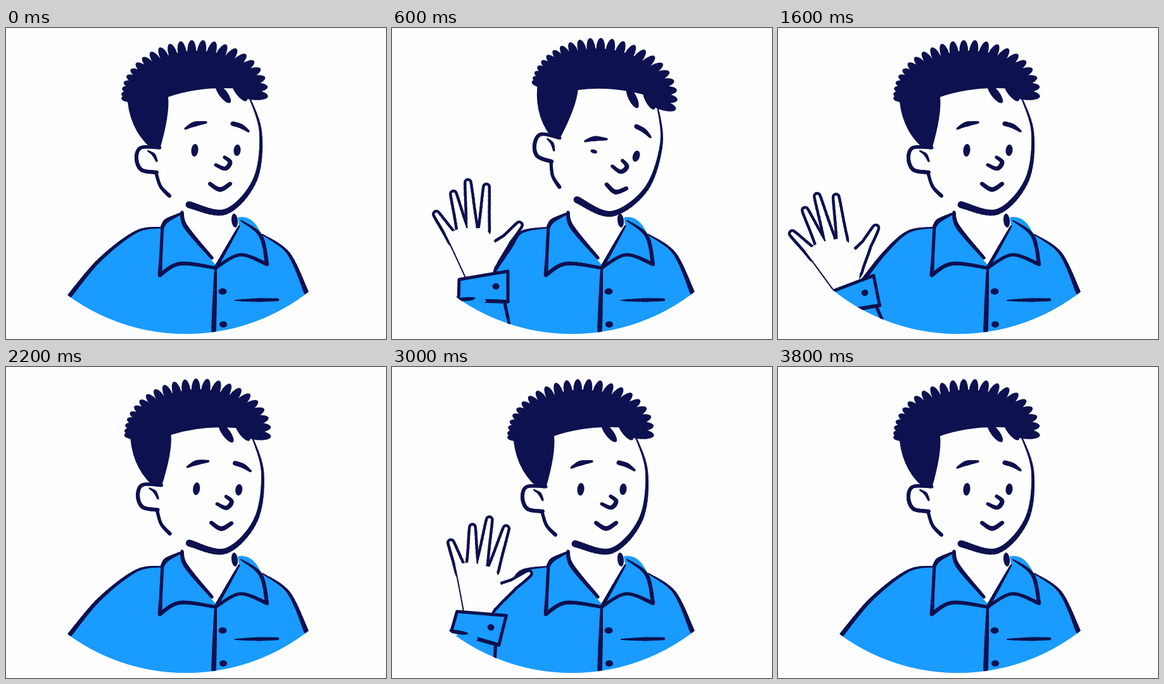
An HTML page with a canvas for the animation above (4 s loop, 600 by 491 pixels).

```html
<!DOCTYPE html>
<html lang="en">
<head>
<meta charset="utf-8">
<title>Waving boy</title>
<style>
  html, body { margin: 0; overflow: hidden; background: #fefdff; }
  canvas { display: block; }
</style>
</head>
<body>
<canvas id="stage" width="600" height="491"></canvas>
<script>
const ctx = document.getElementById('stage').getContext('2d');
const PAPER = '#fefdff', INK = '#0e114f', BLUE = '#199bff';
const LOOP = 4000, WAVE = 2000, STEP = 100;

const mix = (a, b, k) => a + (b - a) * k;
const rad = degrees => degrees * Math.PI / 180;
const smooth = (a, b, t) => {
  const k = Math.min(1, Math.max(0, (t - a) / (b - a)));
  return k * k * (3 - 2 * k);
};

// Smooth curve through a flat list of coordinates.
function curve(flat) {
  const count = flat.length / 2, out = [];
  const at = i => {
    const n = 2 * Math.min(count - 1, Math.max(0, i));
    return [flat[n], flat[n + 1]];
  };
  for (let i = 0; i < count - 1; i++) {
    const [a, b, c, d] = [at(i - 1), at(i), at(i + 1), at(i + 2)];
    for (let u = 0; u < 0.99; u += 0.1) {
      out.push([0, 1].map(n => b[n] + 0.5 * u * (c[n] - a[n] +
        u * (2 * a[n] - 5 * b[n] + 4 * c[n] - d[n] + u * (3 * (b[n] - c[n]) + d[n] - a[n])))));
    }
  }
  return [...out, at(count - 1)];
}

// Line whose width runs from start over middle to end.
function brush([w0, w1, w2], flat, color = INK) {
  const pts = curve(flat), n = pts.length - 1;
  ctx.strokeStyle = color;
  for (let i = 0; i < n; i++) {
    const k = 2 * i / n;
    ctx.lineWidth = k < 1 ? mix(w0, w1, k) : mix(w1, w2, k - 1);
    ctx.beginPath();
    ctx.moveTo(...pts[i]);
    ctx.lineTo(...pts[i + 1]);
    ctx.stroke();
  }
}

function fillPoints(color, pts) {
  ctx.fillStyle = color;
  ctx.beginPath();
  pts.forEach(p => ctx.lineTo(...p));
  ctx.fill();
}

function oval(x, y, rx, ry, angle = 0) {
  ctx.fillStyle = INK;
  ctx.beginPath();
  ctx.ellipse(x, y, rx, ry, angle, 0, 7);
  ctx.fill();
}

function turned(x, y, degrees, draw) {
  ctx.save();
  ctx.translate(x, y);
  ctx.rotate(rad(degrees));
  ctx.translate(-x, -y);
  draw();
  ctx.restore();
}

// Tip and root of each finger, then the thumb.
const FINGERS = [[70, 294, 98, 335], [97, 262, 111, 318], [120, 244, 126, 315], [149, 251, 145, 320]];
const THUMB = [201, 311, 181, 334, 148, 368];

function drawHand() {
  for (const [color, inset] of [[INK, 0], [PAPER, 9]]) {
    FINGERS.forEach(f => brush([14 - inset, 18 - inset, 23 - inset], f, color));
    brush([14 - inset, 20 - inset, 44 - inset], THUMB, color);
  }
  fillPoints(PAPER, [[84, 326], [108, 316], [148, 316], [170, 350], [158, 390], [116, 394]]);
  brush([2, 2, 2], [67, 296, 86, 330, 116, 394]);

  const cuff = [[105, 432], [106, 397], [183, 384], [183, 432]];
  fillPoints(BLUE, cuff);
  ctx.strokeStyle = INK;
  ctx.lineWidth = 5;
  ctx.stroke();
  brush([5, 6, 3], [104, 429, 130, 427]);
  brush([6, 6, 5], [147, 431, 183, 432]);
  brush([5, 5, 3], [178, 434, 186, 472]);
  brush([5, 5, 5], [131, 430, 146, 431], BLUE);
  oval(164, 408, 5.5, 5);
}

function drawShirt(lift) {
  const edge = [mix(101, 160, lift), mix(422, 385, lift),
    mix(148, 187, lift), mix(366, 346, lift), 205, 322, 245, 315];
  ctx.fillStyle = BLUE;
  ctx.beginPath();
  curve(edge).forEach(p => ctx.lineTo(...p));
  ctx.quadraticCurveTo(249, 302, 278, 291);
  ctx.bezierCurveTo(279, 318, 303, 342, 333, 376);
  ctx.lineTo(368, 312);
  ctx.lineTo(366, 299);
  ctx.quadraticCurveTo(389, 294, 403, 325);
  ctx.bezierCurveTo(442, 345, 464, 380, 477, 416);
  ctx.lineTo(477, 500);
  ctx.lineTo(100, 500);
  ctx.lineTo(100, 425);
  ctx.fill();
  brush([7, 5, 2], edge);
}

function drawCollar() {
  brush([3, 7, 5], [278, 292, 254, 304, 247, 314]);
  brush([5, 5, 7], [247, 312, 243, 390]);
  brush([6, 6, 5], [243, 390, 275, 372, 332, 379]);
  brush([5, 7, 5], [278, 291, 284, 314, 325, 363]);
  brush([3, 5, 6], [368, 313, 332, 377]);
  brush([5, 5, 6], [332, 378, 370, 358, 412, 373]);
  brush([2, 6, 6], [371, 304, 402, 328, 412, 372]);
  oval(361, 304, 5, 11, -0.1);
  brush([4, 7, 8], [331, 379, 328, 477]);
  brush([2, 6, 4], [362, 430, 429, 429]);
  oval(342, 416, 6.5, 5);
  oval(343, 468, 6, 5);
  brush([2, 5, 8], [405, 326, 446, 356, 474, 417]);
}

function tuft(x, y, angle, length, width) {
  const a = rad(angle), half = length / 2;
  oval(x - half * Math.cos(a), y - half * Math.sin(a), half, width / 2, a);
}

function drawHair() {
  const tilt = rad(-3), count = 23;
  ctx.fillStyle = INK;
  ctx.beginPath();
  ctx.ellipse(298, 105, 100, 69, tilt, Math.PI, 2 * Math.PI);
  ctx.quadraticCurveTo(320, 87, 256, 109);
  ctx.quadraticCurveTo(259, 136, 243, 191);
  ctx.lineTo(228, 189);
  ctx.quadraticCurveTo(193, 158, 191, 104);
  ctx.fill();
  // Tufts grow and spread out from the nape to the brow.
  for (let i = 0; i < count; i++) {
    const k = i / (count - 1), angle = mix(180, 366, k ** 1.2), a = rad(angle);
    const x = 116 * Math.cos(a), y = 86 * Math.sin(a);
    tuft(298 + x * Math.cos(tilt) - y * Math.sin(tilt),
      105 + x * Math.sin(tilt) + y * Math.cos(tilt),
      angle, mix(26, 46, k), mix(12, 16, k));
  }
  for (const [x, y] of [[354, 118], [380, 115], [402, 113]]) tuft(x, y, 52, 36, 13);
}

function drawHead(tilt, wink) {
  turned(330, 290, 11.5 * tilt, () => {
    brush([2, 7, 11], [383, 106, 402, 165, 393, 240, 347, 290, 289, 279]);
    drawHair();
    const ear = [243, 189, 213, 189, 206, 206, 214, 224, 238, 228];
    fillPoints(PAPER, curve(ear));
    brush([5, 6, 6], ear);
    brush([2, 5, 3], [224, 194, 233, 200, 238, 210]);
    brush([5, 5, 6], [237, 229, 244, 250, 258, 265]);

    const shift = 2 * tilt, drop = 27 * wink;
    brush([3, 8, 3], [283, 159 + drop, 297, 152 + drop, 316, 149 + drop]);
    oval(298 + shift, 193 + 6 * wink, 5.5, mix(10, 3, wink), 0.1);
    oval(365 + shift, 193, 5.5, 9, 0.1);
    ctx.translate(0, -4 * wink);
    brush([7, 7, 3], [358, 151, 371, 155, 383, 163]);
    ctx.translate(shift, 4 * wink);
    brush([5, 7, 5], [331, 216, 346, 222, 354, 212, 345, 204]);
    ctx.translate(3 * shift, 0);
    brush([6, 7, 6], [322, 246, 338, 255, 354, 246]);
  });
}

function drawRing() {
  ctx.save();
  ctx.strokeStyle = ctx.shadowColor = '#d3d0ea';
  ctx.lineWidth = 2.5;
  ctx.shadowBlur = 4;
  ctx.beginPath();
  ctx.arc(570, 318, 25, 0, 7);
  ctx.stroke();
  ctx.restore();
}

function draw(time) {
  const t = time % WAVE;
  const low = 1 - smooth(400, 600, t) + smooth(1450, 1750, t);
  const swing = smooth(600, 1000, t) - smooth(1000, 1600, t);
  const fall = 1 - smooth(600, 1000, t);
  ctx.fillStyle = PAPER;
  ctx.fillRect(0, 0, 600, 491);
  ctx.lineCap = ctx.lineJoin = 'round';
  ctx.save();
  ctx.beginPath();
  ctx.arc(284, 167, 316, 0, 7);
  ctx.clip();
  drawShirt(1 - low);
  ctx.save();
  ctx.translate(-130 * low ** 2, 110 * low ** 3);
  turned(148, 378, 14.2 * swing - 45 * low ** 2, drawHand);
  ctx.restore();
  drawCollar();
  ctx.restore();
  drawHead(smooth(100, 550, t) * fall, smooth(300, 600, t) * fall);
  if (time >= 3200 && time < 3500) drawRing();
}

let shown = -1;
function tick() {
  const time = Math.floor(performance.now() % LOOP / STEP) * STEP;
  if (time !== shown) draw(shown = time);
  requestAnimationFrame(tick);
}
tick();
</script>
</body>
</html>
```
